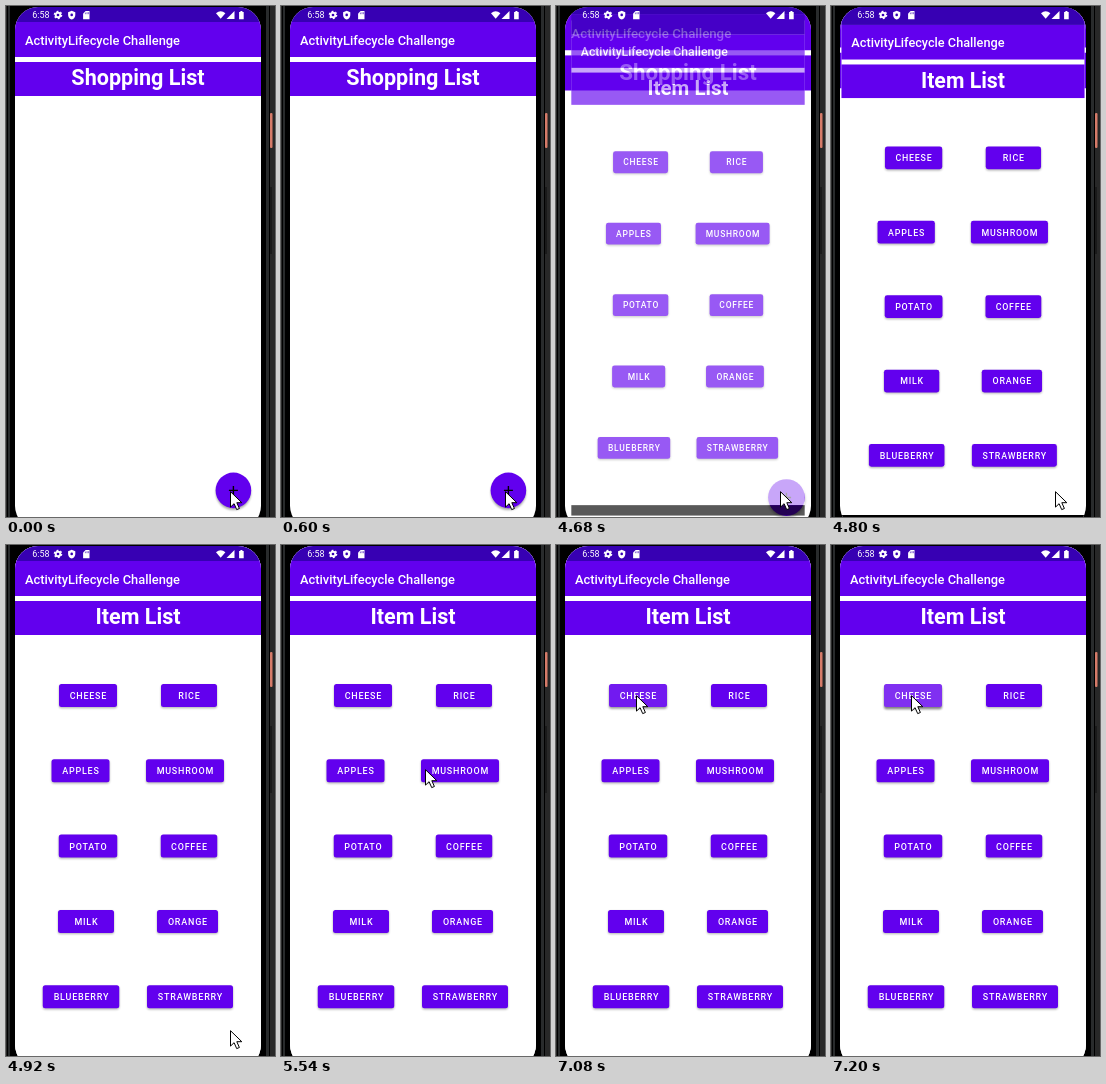
Write an HTML page that moves like this. It is 269 px wide and 511 px high and loops after 8 s.

```html
<!DOCTYPE html>
<html lang="en">
<head>
<meta charset="utf-8">
<title>Shopping List</title>
<style>
  html, body { margin: 0; width: 100%; height: 100%; overflow: hidden; background: #000; }
  svg { display: block; width: 100vw; height: 100vh; }
  text { font-family: Roboto, sans-serif; fill: #fff; }
  .title { font-size: 12.87px; font-weight: 500; }
  .heading { font-size: 21.6px; font-weight: 700; text-anchor: middle; }
  .label { font-size: 8.95px; font-weight: 500; letter-spacing: .089em; text-anchor: middle; }
  .clock { font-size: 9px; }
</style>
</head>
<body>
<svg viewBox="0 0 269 511" xmlns="http://www.w3.org/2000/svg">
  <defs>
    <clipPath id="screen"><rect x="9" y="1" width="246" height="522" rx="23"/></clipPath>
    <filter id="blur" x="-30%" y="-50%" width="160%" height="200%"><feGaussianBlur stdDeviation="1.3"/></filter>
  </defs>
  <rect width="269" height="511" fill="#282828"/>
  <rect x="1" width="263" height="511" fill="#000"/>
  <rect x="2" width="2" height="511" fill="#292b2c"/>
  <rect x="260" width="3" height="511" fill="#292b2c"/>
  <rect x="264" y="181" width="2" height="67" fill="#1a1a1a"/>
  <rect x="264" y="107" width="2.5" height="35" rx="1" fill="#d67b69"/>

  <g clip-path="url(#screen)">
    <g id="shopping"></g>
    <g id="items"></g>
  </g>

  <g fill="#fff">
    <text class="clock" x="26.3" y="12.4">6:58</text>
    <circle cx="52" cy="9" r="2.3" fill="none" stroke="#fff" stroke-width="1.9"/>
    <circle cx="52" cy="9" r="3.7" fill="none" stroke="#fff" stroke-width="1.2" stroke-dasharray="1.9 1.975"/>
    <path d="M65.7 4.8l3.6 1.5v2.6c0 2.3-1.5 3.9-3.6 4.6c-2.1-.7-3.6-2.3-3.6-4.6v-2.6z"/>
    <circle cx="65.7" cy="8.9" r="1.3" fill="#3700b3"/>
    <path d="M79.6 5h3.9v8.3h-6.4v-5.8z"/>
    <path d="M79.4 6.6v1.6M81 6.2v2M82.4 6.2v2" stroke="#3700b3" stroke-width=".6"/>
    <path d="M210 7.2q4.7-3.9 9.4 0l-4.7 5.6z"/>
    <path d="M228.5 5v8h-8z"/>
    <path d="M234.4 5h2v.9h1.3v7.3h-4.6v-7.3h1.3z"/>
  </g>
  <path id="cursor" d="M.5 .7v15.4l3.6-3.4l2.6 5.9l2.7-1.1l-2.6-5.8h5z" fill="#fff" stroke="#000" stroke-width="1" stroke-linejoin="round"/>
</svg>

<script>
const LOOP = 8000, PURPLE = '#6200ee';
const $ = id => document.getElementById(id);

const rect = (x, y, w, h, fill, more = '') =>
  `<rect x="${x}" y="${y}" width="${w}" height="${h}" fill="${fill}" ${more}/>`;

const page = (heading, body) =>
  rect(9, 1, 246, 511, '#fff') +
  rect(9, -30, 246, 46, '#3700b3') +
  rect(9, 16, 246, 35, PURPLE) +
  rect(9, 56, 246, 34, PURPLE) +
  `<text class="title" x="19" y="38.7">ActivityLifecycle Challenge</text>
   <text class="heading" x="132" y="79.4">${heading}</text>` +
  body + rect(9, 512, 246, 11, '#000');

const fab = `
  <circle id="fabShadow" cx="227.4" cy="486.5" r="17.6" fill="#000" opacity=".35" filter="url(#blur)"/>
  <circle cx="227.4" cy="484.4" r="17.8" fill="${PURPLE}"/>
  <circle id="fabRipple" cx="227.4" cy="484.4" r="17.8" fill="#fff" opacity="0"/>
  <path d="M222.9 484.4h9M227.4 479.9v9" stroke="#000" stroke-width="1.4"/>`;

// label, centre x, width; two per row
const buttons = [
  ['CHEESE', 82, 58], ['RICE', 183, 56],
  ['APPLES', 74.5, 58], ['MUSHROOM', 179, 78],
  ['POTATO', 82, 58.5], ['COFFEE', 183, 56.5],
  ['MILK', 80, 56], ['ORANGE', 181.5, 61],
  ['BLUEBERRY', 75, 76.5], ['STRAWBERRY', 184, 86]
];

const button = ([label, cx, w], i) => {
  const x = cx - w / 2, y = 139 + 75.3 * (i >> 1), round = 'rx="2.5"';
  return rect(x, y + 1.2, w, 23, '#000', `${round} opacity=".3" filter="url(#blur)" id="shadow${i}"`) +
    rect(x, y, w, 23, PURPLE, round) +
    rect(x, y, w, 23, '#fff', `${round} opacity="0" id="ripple${i}"`) +
    `<text class="label" x="${cx + .4}" y="${y + 14.9}">${label}</text>`;
};

$('shopping').innerHTML = page('Shopping List', fab);
$('items').innerHTML = page('Item List', buttons.map(button).join(''));

// Each row: start time, then values held until the next row
const pointer = [[0, 224, 485], [5420, 199, 409], [5540, 144, 224], [5910, 116, 189],
  [6030, 89, 161], [6180, 83, 153], [6300, 80, 150]];
const fabPress = [[0, 0], [240, .06], [360, .1], [600, 0]];
const cheesePress = [[0, 0], [7080, .1], [7200, .19]];
// shopping scale, items scale, items opacity
const change = [[0, 1, .9, 0], [4560, 1.006, .9, 0], [4680, 1.032, .9486, .65],
  [4800, 1.045, .988, 1], [4920, 1, 1, 1]];

const at = (steps, t) => steps.findLast(s => s[0] <= t).slice(1);
const zoom = s => `translate(132 262) scale(${s}) translate(-132 -262)`;
const set = (id, name, value) => $(id).setAttribute(name, value);

function draw(t) {
  const [oldScale, newScale, opacity] = at(change, t);
  set('shopping', 'transform', zoom(oldScale));
  set('items', 'transform', zoom(newScale));
  set('items', 'opacity', opacity);
  set('cursor', 'transform', `translate(${at(pointer, t)})`);

  const [fabLight] = at(fabPress, t), [light] = at(cheesePress, t);
  set('fabRipple', 'opacity', fabLight);
  set('fabShadow', 'cy', 486.5 + fabLight * 10);
  set('ripple0', 'opacity', light);
  set('shadow0', 'opacity', .3 + light);
  set('shadow0', 'y', 140.2 + light * 5);
}

const start = performance.now();
function tick() {
  draw((performance.now() - start) % LOOP);
  requestAnimationFrame(tick);
}
tick();
</script>
</body>
</html>
```
